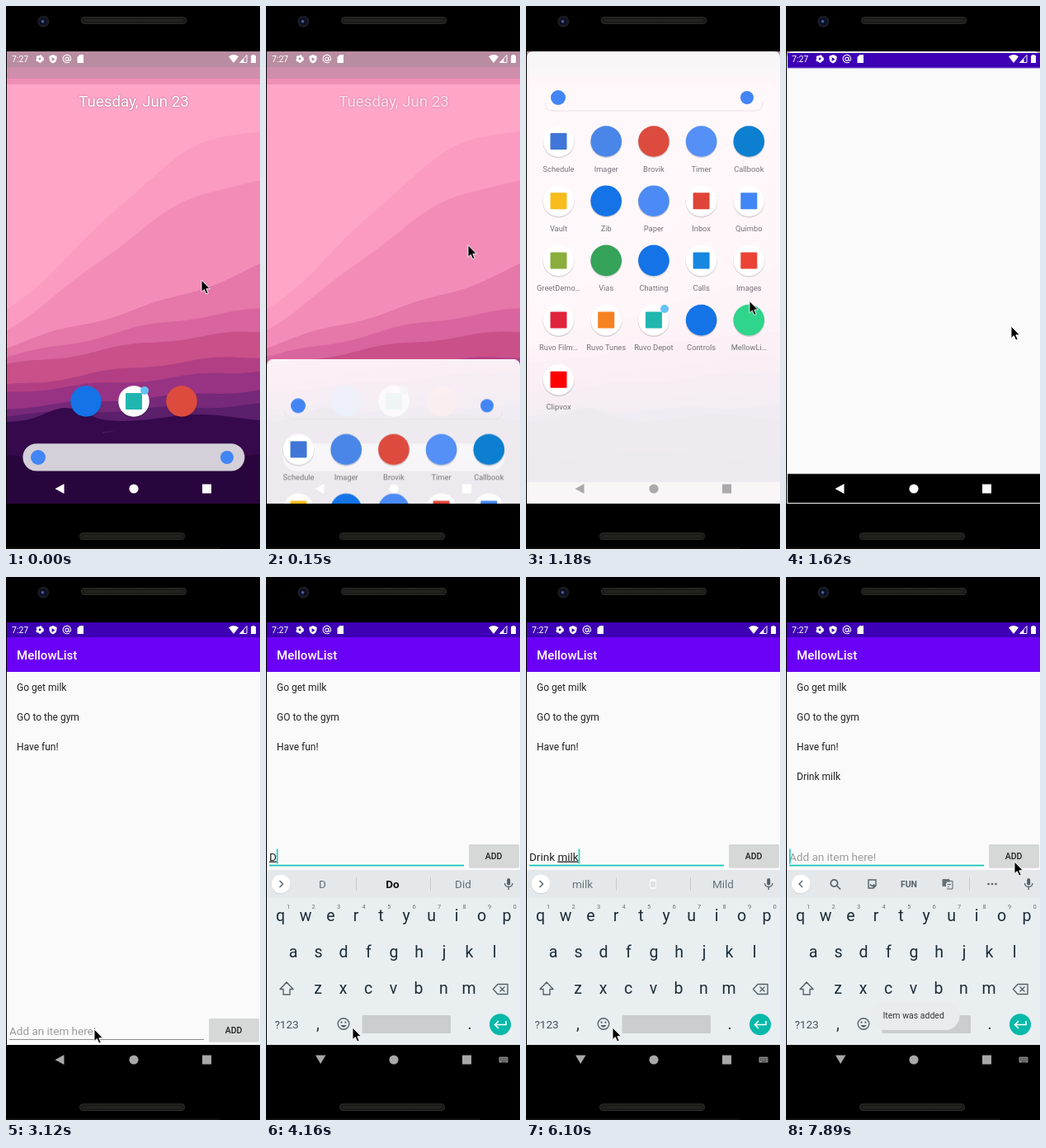
Recreate the animation shown at these times as an HTML page. Size 308 by 658 pixels, loop 8000 ms.

```html
<!DOCTYPE html>
<html lang="en">
<head>
<meta charset="utf-8">
<title>To-do list demo</title>
<style>
html, body { margin: 0; width: 100%; height: 100%; overflow: hidden; background: #000; }
svg { display: block; width: 100vw; height: 100vh; font-family: Roboto, sans-serif; }
text { white-space: pre; }
.mid { text-anchor: middle; }
.medium { font-weight: 500; }
.line { fill: none; stroke: #56626a; stroke-width: 1.4; }
.field { font-size: 13.5px; fill: #222; }
.label { font-size: 9.3px; fill: #77727a; }
.key { font-size: 19.5px; fill: #1c2d38; }
.hint { font-size: 7.5px; fill: #65727a; }
.word { font-size: 13.5px; fill: #66727a; }
</style>
</head>
<body>
<svg id="stage" viewBox="0 0 308 658" preserveAspectRatio="none"></svg>
<script>
const LOOP = 8000, STEP = 148;
const stage = document.getElementById('stage');
const byId = id => document.getElementById(id);

// ---- drawing helpers ----
const rect = (x, y, w, h, fill, r = 0) =>
  `<rect x="${x}" y="${y}" width="${w}" height="${h}" rx="${r}" fill="${fill}"/>`;
const circle = (x, y, r, fill) => `<circle cx="${x}" cy="${y}" r="${r}" fill="${fill}"/>`;
const path = (d, attrs = '') => `<path d="${d}" ${attrs}/>`;
const text = (x, y, cls, value, attrs = '') => `<text x="${x}" y="${y}" class="${cls}" ${attrs}>${value}</text>`;
const group = (id, content) => `<g id="${id}">${content}</g>`;
const each = (list, fn) => [...list].map(fn).join('');

// ---- launcher ----
function land(fill, heightAt) {
  let d = 'M1 603';
  for (let x = 1; x <= 309; x += 4) d += `L${x} ${heightAt(x).toFixed(1)}`;
  return path(d + 'V603Z', `fill="${fill}"`);
}
const peak = (x, at, width, height) => height * Math.exp(-(((x - at) / width) ** 2));

function wallpaper() {
  // colour, height at the left edge, height at the right edge, upward swell
  const slopes = [
    ['#fb9bc1', 367, 151, 65], ['#f38db7', 391, 212, 48], ['#e577a9', 413, 314, -10],
    ['#d9659e', 425, 368, 10], ['#c95089', 435, 395, 8], ['#b23f83', 460, 425, 8],
    ['#983384', 468, 441, 0], ['#752978', 487, 465, 0], ['#5b1f6c', 495, 483, 0],
  ];
  const slope = ([fill, left, right, swell], i) => land(fill, x => {
    const u = (x - 1) / 307;
    return left + (right - left) * u - swell * u * Math.sin(Math.PI * u) + 2 * Math.sin(u * 15 + i);
  });
  return rect(1, 55, 307, 548, '#ffa5c8') + rect(1, 55, 307, 40, '#ee8fb5') +
    rect(1, 55, 307, 33, '#cf8eab') + rect(1, 55, 307, 19, '#b88ca1') + each(slopes, slope) +
    land('#35094c', x => 504 - peak(x, 72, 34, 17) - peak(x, 235, 60, 9)) +
    land('#29053d', x => 544 + 4 * Math.sin(x / 32)) +
    path('M117 518L136 514 117 516Z', 'fill="#4b1761"');
}

const BLUE = '#1473e6';
const tile = (x, y, disc, mark) =>
  circle(x, y + 1.1, 19.2, '#00000026') + circle(x, y, 18.8, disc) +
  (mark ? rect(x - 10, y - 10, 20, 20, mark, 1) : '');
const searchMarks = y => circle(39, y, 9, '#4285f4') + circle(268, y, 8, '#4285f4');

function home() {
  return text(155, 122, 'mid', 'Tuesday, Jun 23',
      'font-size="18.7" fill="#fff" style="text-shadow:0 0 2px #0007"') +
    tile(97, 479, BLUE) + tile(155, 479, '#fff', '#20b6b0') + tile(213, 479, '#dd4b3e') +
    circle(168, 466, 5, '#63c3f4') + rect(20.4, 530.2, 269, 33.4, '#d4cfd8', 16.7) + searchMarks(547);
}

const apps = [
  ['Schedule', '#fff', '#3f76d8'], ['Imager', '#4a86e8'], ['Brovik', '#dd4b3e'], ['Timer', '#5490f5'],
  ['Callbook', '#0c7fd0'], ['Vault', '#fff', '#f8bd1c'], ['Zib', BLUE], ['Paper', '#4c8bf5'],
  ['Inbox', '#fff', '#df4438'], ['Quimbo', '#fff', '#4285f4'], ['GreetDemo…', '#fff', '#8aae3c'],
  ['Vias', '#35a35a'], ['Chatting', BLUE], ['Calls', '#fff', '#1688e0'], ['Images', '#fff', '#ea4335'],
  ['Ruvo Film…', '#fff', '#e0243c'], ['Ruvo Tunes', '#fff', '#f58220'], ['Ruvo Depot', '#fff', '#20b6b0'],
  ['Controls', BLUE], ['MellowLi…', '#2fd58a'], ['Clipvox', '#fff', '#f00'],
];

function drawer() {
  const cells = each(apps, ([name, disc, mark], i) => {
    const x = 39.5 + i % 5 * 57.7, y = 164 + Math.floor(i / 5) * 72.2;
    return tile(x, y, disc, mark) + text(x, y + 36.5, 'mid label', name);
  });
  return rect(1, 55, 307, 900, '#ffffffea', 7) + rect(1, 577, 307, 300, '#fdf7f9e0') +
    path('M23 117Q23 127 33 127H277Q287 127 287 117', 'fill="none" stroke="#eae2e6"') +
    searchMarks(111) + cells + circle(168, 367, 5, '#63c3f4');
}

// ---- system bars ----
const gear = (x, y, r) =>
  `<circle cx="${x}" cy="${y}" r="${r}" fill="none" stroke="#fff" stroke-width="2.6"/>` +
  `<circle cx="${x}" cy="${y}" r="${r + 1.4}" fill="none" stroke="#fff" stroke-width="1.5" stroke-dasharray="2.4 2.3"/>`;

function statusIcons() {
  return `<g fill="#fff">` + text(7, 68, '', '7:27', 'font-size="10.5"') + gear(41, 64, 2.7) +
    path('M57 59L61.5 60.8V64Q61 68 57 69.5Q53 68 52.5 64V60.8ZM55.6 62V67L59.4 64.5Z', 'fill-rule="evenodd"') +
    path('M77 68Q72 70 69.8 66.5A4.8 4.8 0 1 1 78.6 64.8Q77.5 67.5 76 65V62M76 64A2.1 2.1 0 1 1 72 63.4A2.1 2.1 0 0 1 76 64',
      'fill="none" stroke="#fff" stroke-width="1.1"') +
    path('M89.5 59H94V69H86.5V62Z') +
    path('M270 61.2Q276 57 282 61.2L276 69Z') +
    path('M292 59.5V68.5H283.5Z', 'fill="none" stroke="#fff"') + path('M288.5 63.5V68.5H283.5Z') +
    path('M298.5 59H301.5V60H303V69H297V60H298.5Z') + `</g>`;
}

function navIcons() {
  return group('navBack', path('M70.5 579V591L59.5 585Z')) +
    group('navDown', path('M60 579.5H72.5L66.2 590Z') +
      rect(282.5, 581.5, 11, 7, '#8b8b8b', 1) +
      path('M284 583.7H293M284 585.7H293M286 587.4H291', 'stroke="#000" stroke-width=".9" stroke-dasharray="1 .9"')) +
    `<circle cx="155" cy="585" r="5.6"/><rect x="238" y="579.5" width="11" height="11"/>`;
}

// ---- to-do app ----
const STATUS = '#3d00b4';

const splash = () => rect(1, 55, 307, 548, '#fafafa') + rect(1, 55, 307, 18.5, STATUS) + rect(1, 567.8, 307, 35.2, '#000');

function field() {
  return rect(1, 322, 307, 34, '#fafafa') +
    group('hint', text(4, 343.5, 'field', 'Add an item here!', 'style="fill:#9c9c9c"')) +
    group('plainLine', rect(4, 349, 236, 1, '#8c8c8c')) +
    group('focusLine', rect(4, 348.7, 236, 1.7, '#0cc8b8')) +
    group('entry', '') + group('caret', rect(0, 329.5, 1.5, 18, '#0cc8b8')) +
    rect(246, 325, 61, 28, '#00000018', 2) + rect(246, 324, 61, 28, '#d6d7d7', 1.5) +
    group('pressed', rect(246, 324, 61, 28, '#c6c7c7', 1.5)) +
    text(276, 342, 'mid medium', 'ADD', 'font-size="10.5" fill="#1f1f1f"');
}

const dividers = (...places) => each(places, x => rect(x, 364, 1, 16, '#c3cacf'));

function toolbar() {
  return path('M20 368L16 372 20 376', 'class="line"') +
    path('M62 374.5L66 378.5M62.6 371A4.2 4.2 0 1 1 54.2 371A4.2 4.2 0 1 1 62.6 371', 'class="line" style="stroke-width:1.7"') +
    path('M100 367H109V374L106 377H100ZM106 377V374H109M102 372.5Q104.5 376 107 372.5', 'class="line"') +
    text(149, 375.7, 'mid', 'FUN', 'font-size="10.5" font-weight="700" fill="#56626a"') +
    rect(189.5, 366, 9, 9, '#66727a', 1) + rect(194, 369.5, 8, 8.5, '#e4e8eb') +
    path('M193 368.5H202V378H195M191.5 370.5H195M195.5 372.5H200M198 374.5L196 376', 'class="line" style="stroke-width:1"') +
    dividers(222) + each([245.5, 250, 254.5], x => circle(x, 372, 1.3, '#56626a'));
}

function suggestions(left, middle, right) {
  const glass = rect(150, 366, 8, 12, '#f7f8f8', 1.5) + rect(151, 369, 6, 7, '#dde1e3', 1);
  return path('M16.5 368L20.5 372 16.5 376', 'class="line"') + dividers(109, 199) +
    text(68.5, 377, 'mid word', left) + text(239, 377, 'mid word', right) +
    (middle ? text(153.5, 377, 'mid word', middle, 'style="font-weight:700;fill:#111"') : glass);
}

function keyboard() {
  const row = (letters, x0, y) => each(letters, (c, i) => text(x0 + i * 30.5, y, 'mid key', c));
  return rect(1, 355, 307, 212, '#e9eef1') + rect(1, 355, 307, 33.5, '#e4e8eb') +
    circle(18, 372.6, 11.5, '#0000001c') + circle(18, 372, 11.3, '#fff') + group('strip', '') +
    rect(292.2, 365, 4, 8.5, '#56626a', 2) +
    path('M289.5 371Q290 375.5 294.2 375.5Q298.4 375.5 299 371M294.2 375.5V379', 'class="line"') +
    row('qwertyuiop', 17.5, 417) + row('asdfghjkl', 33, 461) + row('zxcvbnm', 63, 505) +
    each('1234567890', (c, i) => text(27 + i * 30.5, 402, 'mid hint', c)) +
    path('M25 491L33 499.5H29V506H21V499.5H17Z', 'class="line" stroke-linejoin="round"') +
    path('M281 493.5H293V505.5H281L275.5 499.5ZM283.5 496.5L289.5 502.5M289.5 496.5L283.5 502.5', 'class="line" stroke-linejoin="round"') +
    text(25, 547, 'mid', '?123', 'font-size="13.5" fill="#43525b"') +
    text(63, 548, 'mid key', ',') + text(247, 548, 'mid key', '.') +
    `<circle cx="94" cy="541.5" r="6.8" class="line"/>` + circle(91.6, 539.7, 1.1, '#56626a') + circle(96.4, 539.7, 1.1, '#56626a') +
    path('M90.3 543Q94 548.5 97.7 543Z', 'fill="#56626a"') +
    rect(116.5, 531, 107.5, 22, '#c9cdd0', 1.5) + circle(284, 542.3, 13, '#06b9a9') +
    path('M291 538V542.5H278M282 538L277.5 542.5 282 547', 'class="line" style="stroke:#fff;stroke-width:1.6"');
}

function app() {
  const item = (name, i) => text(13, 137.5 + i * 36, '', name, 'font-size="12" fill="#222"');
  return rect(1, 55, 307, 548, '#fafafa') + rect(1, 55, 307, 18, STATUS) + rect(1, 73, 307, 42, '#6b00f6') +
    text(13, 100, 'medium', 'MellowList', 'font-size="15" fill="#fff"') +
    each(['Go get milk', 'GO to the gym', 'Have fun!'], item) + group('newItem', item('Drink milk', 3)) +
    group('field', field()) + group('keyboard', keyboard()) +
    group('toast', rect(104, 514, 106.5, 35, '#e8ecef', 17)) +
    group('toastText', text(117.5, 535, '', 'Item was added', 'font-size="10.5" fill="#333"')) +
    rect(1, 567, 307, 36, '#000');
}

// ---- device ----
const speaker = (x, y) =>
  `<rect x="${x}" y="${y}" width="127" height="8" rx="3.5" fill="#1b1b19" stroke="#2b2b28"/>` +
  path(`M${x + 4} ${y + 4}H${x + 123}`, 'stroke="#262623" stroke-width="3" stroke-dasharray="2 1"');

stage.innerHTML =
  `<clipPath id="screen"><rect x="1" y="55" width="307" height="548"/></clipPath>` +
  rect(0, 0, 308, 658, '#000') + rect(0, 656, 259, 2, '#10100f') +
  circle(45.3, 18.7, 7, '#1d1e24') + circle(45.3, 18.7, 5, '#0e1122') + circle(44.5, 18.7, 1.8, '#4a5cab') +
  speaker(91.5, 13.5) + speaker(89.5, 638.5) +
  `<g clip-path="url(#screen)">` + wallpaper() + group('home', home()) + group('drawer', drawer()) +
  group('splash', splash()) + group('app', app()) + group('status', statusIcons()) + group('nav', navIcons()) + `</g>` +
  group('pointer', path('M0 0V14.5L3.3 11.6 5.7 17 8.2 16 5.8 10.7H10.4Z', 'fill="#000" stroke="#fff" stroke-width=".9"'));

// ---- motion ----
function animate(id, prop, rows, easing) {
  const ends = [[0, rows[0][1]], ...rows, [LOOP, rows.at(-1)[1]]];
  const frames = ends.map(([time, value], i) => ({
    offset: time / LOOP, [prop]: value, easing: easing(time, (ends[i + 1] || ends[i])[0]),
  }));
  (byId(id) || id).animate(frames, { duration: LOOP, iterations: Infinity });
}
// Each value holds until the next row.
const hold = (id, prop, rows) => animate(id, prop, rows, () => 'step-end');
// Values run evenly from row to row, refreshed once per STEP.
const glide = (id, prop, rows) => animate(id, prop, rows,
  (from, to) => `steps(${Math.max(1, Math.round((to - from) / STEP))}, end)`);
const show = (id, from, to = LOOP) => hold(id, 'opacity', [[0, from ? 0 : 1], [from, 1], [to, to < LOOP ? 0 : 1]]);
const at = (x, y, scale = 1) => `translate(${x}px, ${y}px) scale(${scale})`;

const SWIPED = 440, TAP = 1180, LAUNCHED = 1620, READY = 1770;
const FOCUS = 3410, OPEN = 3560, TYPE = 4010, PRESS = 7440, ADDED = 7590;

glide('pointer', 'transform', [
  [0, at(237, 332)], [SWIPED, at(261, 205)], [1320, at(273, 388)], [READY, at(273, 388)],
  [2220, at(237, 246)], [2820, at(114, 562)], [3120, at(107, 548)], [3270, at(105, 546)],
  [6400, at(105, 546)], [7290, at(277, 345)],
]);

glide('home', 'opacity', [[0, 1], [SWIPED, 0]]);
glide('drawer', 'transform', [[0, at(0, 560)], [SWIPED, at(0, 0)]]);
show('splash', TAP + STEP, READY);
glide('splash', 'transform', [[TAP, at(270, 380, 0)], [LAUNCHED, at(1.1, 2, 0.995)]]);
show('app', READY);
hold('status', 'opacity', [[0, 1], [2 * STEP, 0], [LAUNCHED, 1]]);
hold('nav', 'fill', [[0, '#fff'], [2 * STEP, '#ada8ab'], [LAUNCHED, '#fff'], [READY, '#a8a8a8']]);
show('navBack', 0, OPEN);
show('navDown', OPEN);

hold('field', 'transform', [[0, at(0, 211)], [OPEN, at(0, 0)]]);
show('plainLine', 0, FOCUS);
show('focusLine', FOCUS);
show('caret', FOCUS);
hold('hint', 'opacity', [[0, 1], [TYPE, 0], [ADDED, 1]]);
glide('keyboard', 'transform', [[FOCUS, at(0, 220)], [3710, at(0, 0)]]);

// Typing comes in bursts of one letter per STEP.
const bursts = [[TYPE, 'D'], [4760, 'rink'], [5500, ' milk']];
const offers = ['Do Did', 'Dry Draw', 'Drip Drink', 'Drink Drinks', 'Drinks Drinking',
  'and with', 'my me', 'mix mind', 'milk mild', ' Mild'];
let typed = '';
const strokes = bursts.flatMap(([start, letters]) => [...letters].map((letter, i) => {
  typed += letter;
  const split = typed.lastIndexOf(' ') + 1;
  return { time: start + i * STEP, done: typed.slice(0, split), word: typed.slice(split) };
}));

byId('entry').innerHTML = each(strokes, ({ done, word }) =>
  `<g>${text(4, 343.5, 'field', `${done}<tspan text-decoration="underline">${word}</tspan>`)}</g>`);
byId('strip').innerHTML = `<g>${toolbar()}</g>` +
  each(strokes, ({ word }, i) => `<g>${suggestions(word, ...offers[i].split(' '))}</g>`);

const entries = [...byId('entry').children];
const [tools, ...strips] = byId('strip').children;
const stripStart = TYPE + STEP, stripEnd = ADDED + STEP;
strokes.forEach(({ time }, i) => {
  const next = strokes[i + 1]?.time;
  show(entries[i], time, next ?? ADDED);
  show(strips[i], Math.max(time, stripStart), next ?? stripEnd);
});
hold(tools, 'opacity', [[0, 1], [stripStart, 0], [stripEnd, 1]]);
hold('caret', 'transform', [
  [0, at(4, 0)],
  ...strokes.map(({ time }, i) => [time, at(4 + entries[i].firstChild.getComputedTextLength(), 0)]),
  [ADDED, at(4, 0)],
]);

show('pressed', PRESS, stripEnd);
glide('newItem', 'opacity', [[PRESS, 0], [stripEnd, 1]]);
show('toast', ADDED);
glide('toastText', 'opacity', [[PRESS, 0], [7885, 1]]);
</script>
</body>
</html>
```
